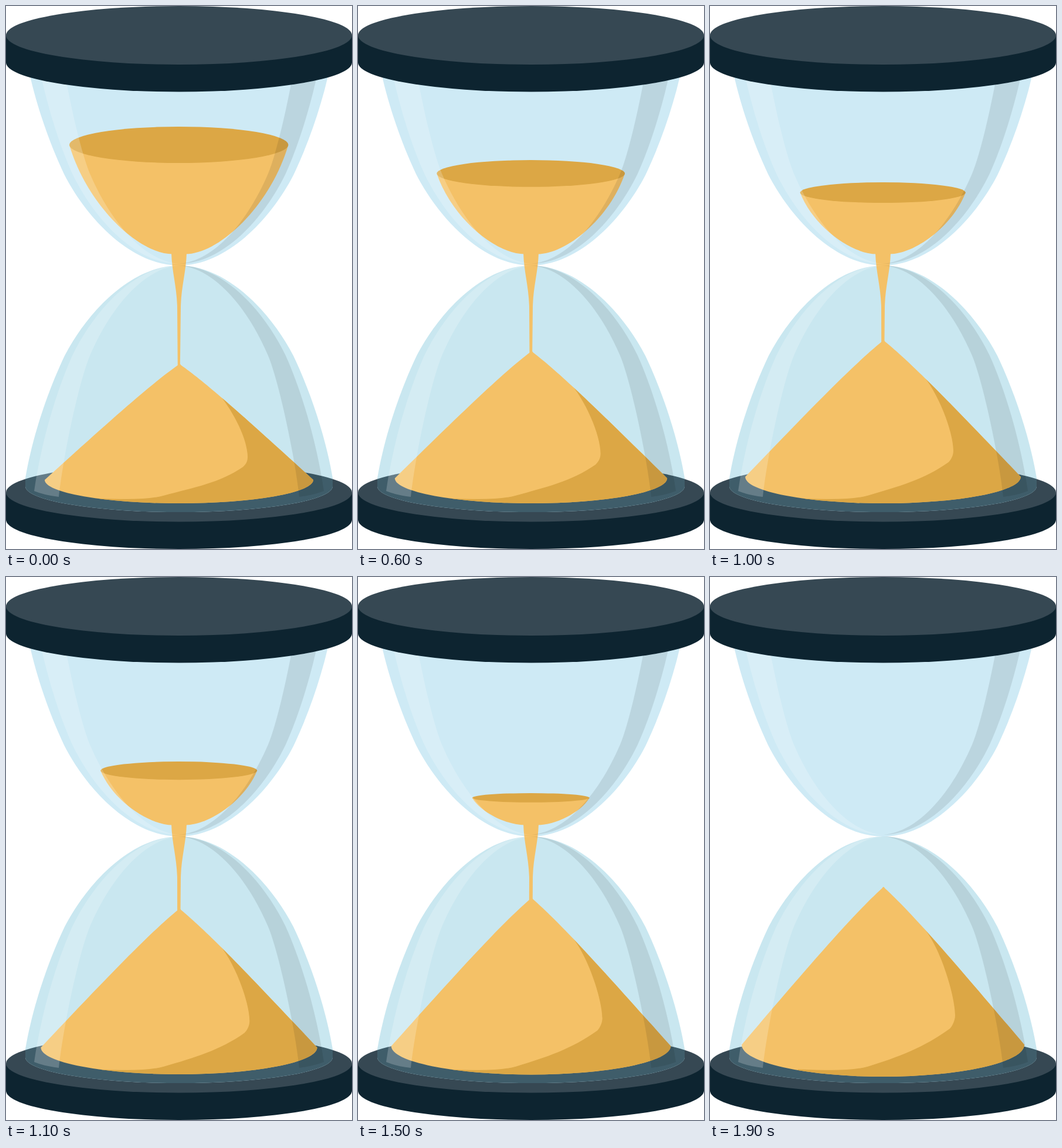
Write an HTML page that moves like this. It is 590x927 px and loops after 2.4 s.

```html
<!DOCTYPE html>
<html lang="en">
<head>
<meta charset="utf-8">
<title>Hourglass</title>
<style>
  html, body { margin: 0; width: 100%; height: 100%; overflow: hidden; background: #fff; }
  svg { display: block; width: 100%; height: 100%; }
  .rim { fill: #0d2430; }
  .face { fill: #364853; }
  .sand { fill: #f4c167; }
  .dark { fill: #dca745; }
</style>
</head>
<body>
<svg viewBox="0 0 590 927">
  <defs>
    <path id="bulb" d="M33 806C45 735 71 658 100 597C140 520 215 443 295 443C375 443 450 520 490 597C519 658 545 735 557 806V820A262 44 0 0 1 33 820Z"/>
    <path id="gleam" d="M48 828C60 745 86 657 113 597C150 520 220 443 295 443C235 447 178 515 143 597C125 640 98 765 90 838Q65 835 48 828Z"/>
    <g id="reflections">
      <use href="#gleam" fill="#fff" fill-opacity=".2"/>
      <use href="#gleam" transform="matrix(-1 0 0 1 590 0)" fill-opacity=".09"/>
    </g>
    <g id="lid">
      <path class="rim" d="M0 50V96.5A295 50 0 0 0 590 96.5V50Z"/>
      <ellipse class="face" cx="295" cy="50" rx="295" ry="50"/>
    </g>
    <clipPath id="baseFace"><ellipse cx="295" cy="830.5" rx="295" ry="50"/></clipPath>
    <clipPath id="pileClip"><path id="pileEdge"/></clipPath>
  </defs>

  <use href="#lid" y="780.5"/>
  <use href="#bulb" transform="matrix(1 0 0 -1 0 886)" fill="#ceeaf5"/>
  <use href="#bulb" fill="#c9e7f0"/>
  <g clip-path="url(#baseFace)"><use href="#bulb" fill="#3f5d6a"/></g>

  <use href="#pileEdge" class="sand"/>
  <g clip-path="url(#pileClip)"><path id="pileShade" class="dark"/></g>

  <g id="falling">
    <path id="heap" class="sand"/>
    <ellipse id="surface" class="dark"/>
    <path id="stream" class="sand"/>
  </g>

  <use href="#reflections" transform="matrix(1 0 0 -1 0 883)"/>
  <use href="#reflections"/>
  <use href="#lid"/>
</svg>
<script>
  const LOOP = 2400, STEP = 100, LAST = 19;
  const el = id => document.getElementById(id);
  const mix = (a, b, p) => a + (b - a) * p;

  // Piecewise linear value through [step, value] points.
  function track(points, step) {
    const i = Math.max(1, points.findIndex(([s]) => s >= step));
    const [s0, v0] = points[i - 1], [s1, v1] = points[i];
    return mix(v0, v1, (step - s0) / (s1 - s0));
  }

  const surfaceTop = step => track([[0, 206], [10, 301], [13, 343], [19, 421]], step);
  const pileApex = step => track([[0, 610], [3, 602], [LAST, 528.5]], step);

  function drawUpper(top, apex) {
    const floor = 423.5, cx = 294.7;
    const ry = 31 - .1415 * (top - 206), cy = top + ry;
    const depth = Math.max(0, floor - cy);
    const rx = 32 + 8.6 * Math.sqrt(depth) + .2 * depth; // width of the glass at this level
    const left = cx - rx, right = cx + rx;
    const dl = 284 - left, dr = right - 306, knee = cy + .554 * depth;
    el('heap').setAttribute('d',
      `M${left} ${cy}C${left + .172 * dl} ${knee} ${284 - .328 * dl} ${floor} 284 ${floor}H306` +
      `C${306 + .328 * dr} ${floor} ${right - .172 * dr} ${knee} ${right} ${cy}Z`);
    Object.entries({ cx, cy, rx, ry }).forEach(([k, v]) => el('surface').setAttribute(k, v));

    const half = mix(2, 3, (610 - apex) / 64), end = apex + 5;
    el('stream').setAttribute('d',
      `M282 422C283 455 291.5 480 292 515L${294.8 - half} ${end}H${294.8 + half}` +
      `L298 515C298.5 480 307 455 308 422Z`);
  }

  function drawPile(apex, p) {
    const half = mix(229, 241, p), corner = mix(809, 798.5, p);
    const bottom = 849 + 4 * p ** 9; // the base spreads only at the end
    const cx = 295, tipX = 295.8, tipY = apex + 3;
    const at = (side, fx, fy) =>
      `${mix(tipX + side * 2.5, cx + side * half, fx)} ${mix(tipY, corner, fy)}`;
    el('pileEdge').setAttribute('d',
      `M${at(-1, 1, 1)}C${at(-1, .45, .42)} ${at(-1, .2, .165)} ${at(-1, 0, 0)}` +
      `Q${tipX} ${apex - 2} ${at(1, 0, 0)}C${at(1, .2, .165)} ${at(1, .45, .42)} ${at(1, 1, 1)}` +
      `A${half} ${bottom - corner} 0 0 1 ${cx - half} ${corner}Z`);

    const top = mix(656, 592, p), noseX = mix(412, 418, p), noseY = mix(770, 748, p);
    const bendX = mix(404, 409, p), bendY = mix(787, 771, p);
    el('pileShade').setAttribute('d',
      `M358 ${top - 30}V${top}C${mix(386, 392, p)} ${top + 33} ${noseX} ${noseY - 32} ${noseX} ${noseY}` +
      `C${noseX} ${noseY + 9} ${bendX + 4} ${bendY - 4} ${bendX} ${bendY}` +
      `C365 ${mix(814, 803, p)} 320 ${mix(822, 820, p)} 270 835.5C240 844 200 842 150 840.5` +
      `V900H600V${top - 30}Z`);
  }

  let shown = -1;
  function draw(time) {
    const step = Math.min(LAST, Math.floor(time % LOOP / STEP));
    if (step === shown) return;
    const apex = pileApex(step);
    drawUpper(surfaceTop(step), apex);
    drawPile(apex, (610 - apex) / 81.5);
    el('falling').setAttribute('visibility', step < LAST ? 'visible' : 'hidden');
    shown = step;
  }

  let start;
  function loop(now) {
    start ??= now;
    draw(Math.max(0, now - start));
    requestAnimationFrame(loop);
  }
  draw(0);
  requestAnimationFrame(loop);
</script>
</body>
</html>
```
